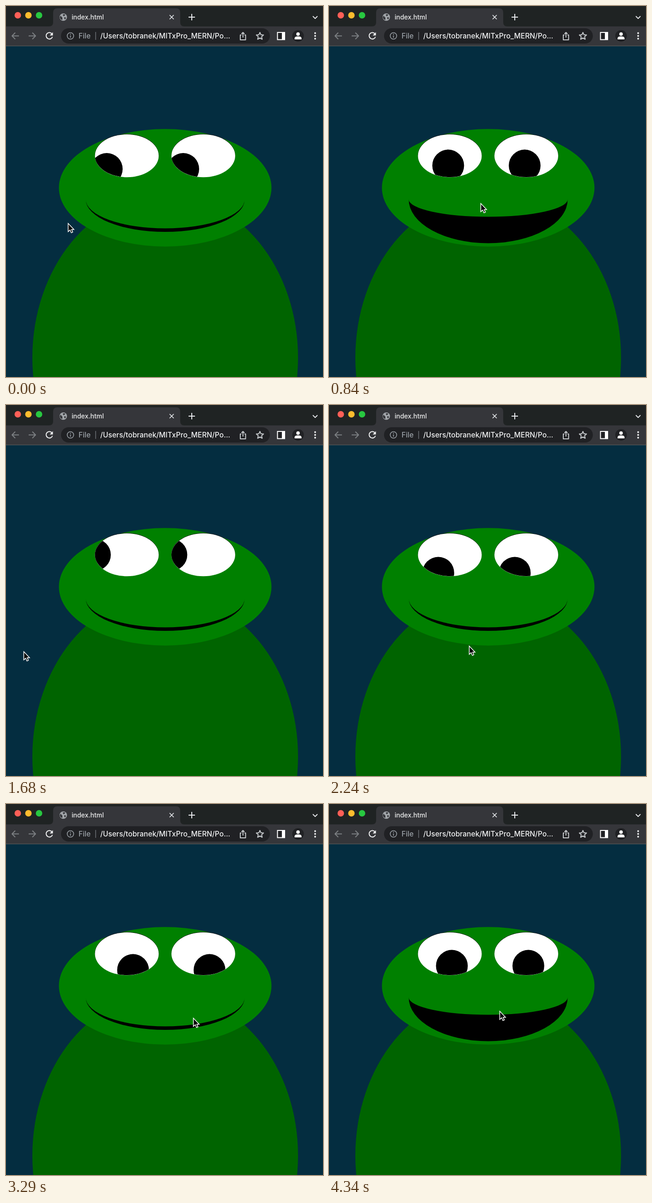
Recreate the animation shown at these times as an HTML page. Size 686 by 800 pixels, loop 4410 ms.

```html
<!DOCTYPE html>
<html lang="en">
<head>
<meta charset="utf-8">
<title>index.html</title>
<style>
  html, body { margin: 0; width: 100%; height: 100%; overflow: hidden; background: #042d40; }
  svg { display: block; width: 686px; height: 800px; }
  text { font-family: Inter, Roboto, sans-serif; font-weight: 500; }
  .line { fill: none; stroke-width: 2; stroke-linejoin: round; }
</style>
</head>
<body>
<svg viewBox="0 0 686 800">
  <defs>
    <clipPath id="eyeClip"><ellipse cx="261.5" cy="323" rx="69" ry="46"/></clipPath>
    <g id="eye">
      <ellipse cx="261.5" cy="322.2" rx="69" ry="46.2"/>
      <ellipse cx="261.5" cy="323" rx="69" ry="46.2" fill="#fff"/>
      <g clip-path="url(#eyeClip)"><circle id="pupil" cx="261.5" cy="323" r="34.4"/></g>
    </g>
  </defs>

  <!-- page -->
  <rect width="686" height="800" fill="#042d40"/>
  <ellipse cx="344.5" cy="758" rx="287.5" ry="351" fill="#006400"/>
  <ellipse cx="344.5" cy="392" rx="230" ry="126.7" fill="#008000"/>
  <use href="#eye"/>
  <use href="#eye" x="165.5"/>
  <path id="mouth"/>

  <!-- tab strip -->
  <rect width="686" height="46" fill="#1f2323"/>
  <path d="M93 44q9 0 9-9V14q0-9 9-9H368q9 0 9 9V35q0 9 9 9z" fill="#35363a"/>
  <circle cx="25.5" cy="20" r="7" fill="#ff5f57"/>
  <circle cx="48.5" cy="20" r="7" fill="#febc2e"/>
  <circle cx="71.5" cy="20" r="7" fill="#28c840"/>
  <circle cx="124" cy="24" r="8" fill="#a0a4a8"/>
  <path d="M118 21l4 4v5q-5-1-5.500-6zM123 18h5l-1 3-3 1zM126 24l4 1-2 4-2-2z" fill="#35363a"/>
  <text x="142" y="29" font-size="14" fill="#eceded">index.html</text>
  <g class="line" stroke="#e8eaed">
    <path d="M354 19.500l9 9m0-9l-9 9" stroke-width="1.700"/>
    <path d="M395 24h14m-7-7v14"/>
    <path d="M664 22l5 5 5-5" stroke-width="1.800"/>
  </g>

  <!-- toolbar -->
  <rect y="44" width="686" height="42" fill="#35363a"/>
  <rect y="85.500" width="686" height="1.200" fill="#5b5b58"/>
  <rect x="119" y="48" width="452" height="33" rx="16.500" fill="#202124"/>
  <g class="line" stroke="#7d8083" stroke-width="1.800">
    <path d="M28 64.500H13m7-7l-7 7 7 7"/>
    <path d="M49 64.500h15m-7-7l7 7-7 7"/>
  </g>
  <path class="line" d="M99.500 60A7 7 0 1 0 100.500 66.500" stroke="#f0f1f2"/>
  <path d="M101.500 56.500v7h-7z" fill="#f0f1f2"/>
  <g class="line" stroke="#9aa0a6">
    <circle cx="139.500" cy="64.500" r="7" stroke-width="1.600"/>
    <path d="M139.500 63.500v5m0-8.500v2" stroke-width="1.700"/>
    <path d="M194 56v17" stroke="#6c7074" stroke-width="1.500"/>
  </g>
  <text x="157" y="70" font-size="15.600" fill="#9aa0a6">File</text>
  <text x="204" y="70" font-size="15.600" fill="#f1f2f3">/Users/tobranek/MITxPro_MERN/Po...</text>
  <g class="line" stroke="#c5c8cb" stroke-width="1.600">
    <path d="M509.500 62.500H507V73H518.500V62.500H516M512.800 68V57m-3.300 3.300l3.300-3.300 3.300 3.300"/>
    <path d="M549.500 57l2.300 5.100 5.500.5-4.200 3.700 1.300 5.500-4.900-2.900-4.900 2.900 1.300-5.500-4.200-3.700 5.500-.5z"/>
  </g>
  <rect x="587.500" y="57" width="15.500" height="15.500" fill="#202124" stroke="#fff" stroke-width="2"/>
  <rect x="597" y="57" width="6" height="15.500" fill="#fff"/>
  <circle cx="632" cy="64.500" r="12.500" fill="#202124"/>
  <circle cx="632" cy="60.500" r="3.800" fill="#fff"/>
  <path d="M624.500 72v-2.500q0-4 7.500-4t7.500 4V72z" fill="#fff"/>
  <path d="M669 58.500v0m0 6v0m0 6v0" stroke="#f0f1f2" stroke-width="3.800" stroke-linecap="round"/>

  <path id="cursor" d="M.5 .8V18.600L4.600 15 7.300 21 10.400 19.700 7.900 13.900H13Z" stroke="#fff" stroke-width="1.500"/>
</svg>
<script>
const LOOP = 4410, STEP = 70;
const CENTER = [320, 330], SQUASH = 0.75;

// The pointer swings counterclockwise around CENTER; the gaze trails behind it.
const poses = [
  { time: 0,    turn: 0, pointer: [134, 468], gaze: [137, 461] },
  { time: 840,  turn: 0, pointer: [328, 425], gaze: [327, 425] },
  { time: 1680, turn: 1, pointer: [38, 531],  gaze: [15, 310] },
  { time: 2240, turn: 2, pointer: [303, 519], gaze: [225, 512] },
  { time: 2520, turn: 3, pointer: [35, 415],  gaze: [104, 310] },
  { time: 3290, turn: 4, pointer: [405, 461], gaze: [408, 493] },
  { time: 4340, turn: 4, pointer: [369, 446], gaze: [365, 449] }
];

const el = id => document.getElementById(id);
const times = poses.map(p => p.time);

// monotone cubic through the given values, at rest at both ends
function curve(values) {
  const rate = i => (values[i + 1] - values[i]) / (times[i + 1] - times[i]);
  const slopes = values.map((_, i) => {
    if (i === 0 || i === values.length - 1) return 0;
    const a = rate(i - 1), b = rate(i);
    return a * b > 0 ? 2 * a * b / (a + b) : 0;
  });
  return t => {
    const i = Math.max(0, times.findLastIndex((s, k) => s <= t && k < times.length - 1));
    const span = times[i + 1] - times[i];
    const u = Math.min(1, (t - times[i]) / span), v = 1 - u;
    return v * v * ((1 + 2 * u) * values[i] + u * span * slopes[i]) +
           u * u * ((3 - 2 * u) * values[i + 1] - v * span * slopes[i + 1]);
  };
}

// path around CENTER through one point of each pose
function orbit(part) {
  const polar = poses.map(p => {
    const dx = p[part][0] - CENTER[0], dy = (p[part][1] - CENTER[1]) / SQUASH;
    return { angle: Math.atan2(dx, dy) + p.turn * 2 * Math.PI, radius: Math.hypot(dx, dy) };
  });
  const angle = curve(polar.map(p => p.angle)), radius = curve(polar.map(p => p.radius));
  return t => [
    CENTER[0] + radius(t) * Math.sin(angle(t)),
    CENTER[1] + radius(t) * Math.cos(angle(t)) * SQUASH
  ];
}

const pointerAt = orbit('pointer'), gazeAt = orbit('gaze');

function mouthPath(open) {
  const [outer, inner] = open ? [94.5, 37.5] : [70, 62.5];
  return `M172.500 417A172 ${outer} 0 0 0 516.500 417A172 ${inner} 0 0 1 172.500 417Z`;
}

function draw(t) {
  el('cursor').setAttribute('transform', `translate(${pointerAt(t)})`);

  // pupils never rise above the middle of the eye
  const [x, y] = gazeAt(t);
  el('pupil').setAttribute('cx', 261.5 + 0.21 * (x - 344));
  el('pupil').setAttribute('cy', 323 + 0.206 * Math.max(0, y - 323));

  const hover = Math.hypot((x - 344) / 172, (y - 417) / 75) < 1;
  el('mouth').setAttribute('d', mouthPath(hover));
}

const start = performance.now();
function tick() {
  const t = (performance.now() - start) % LOOP;
  draw(Math.floor(t / STEP) * STEP);
  requestAnimationFrame(tick);
}
tick();
</script>
</body>
</html>
```
